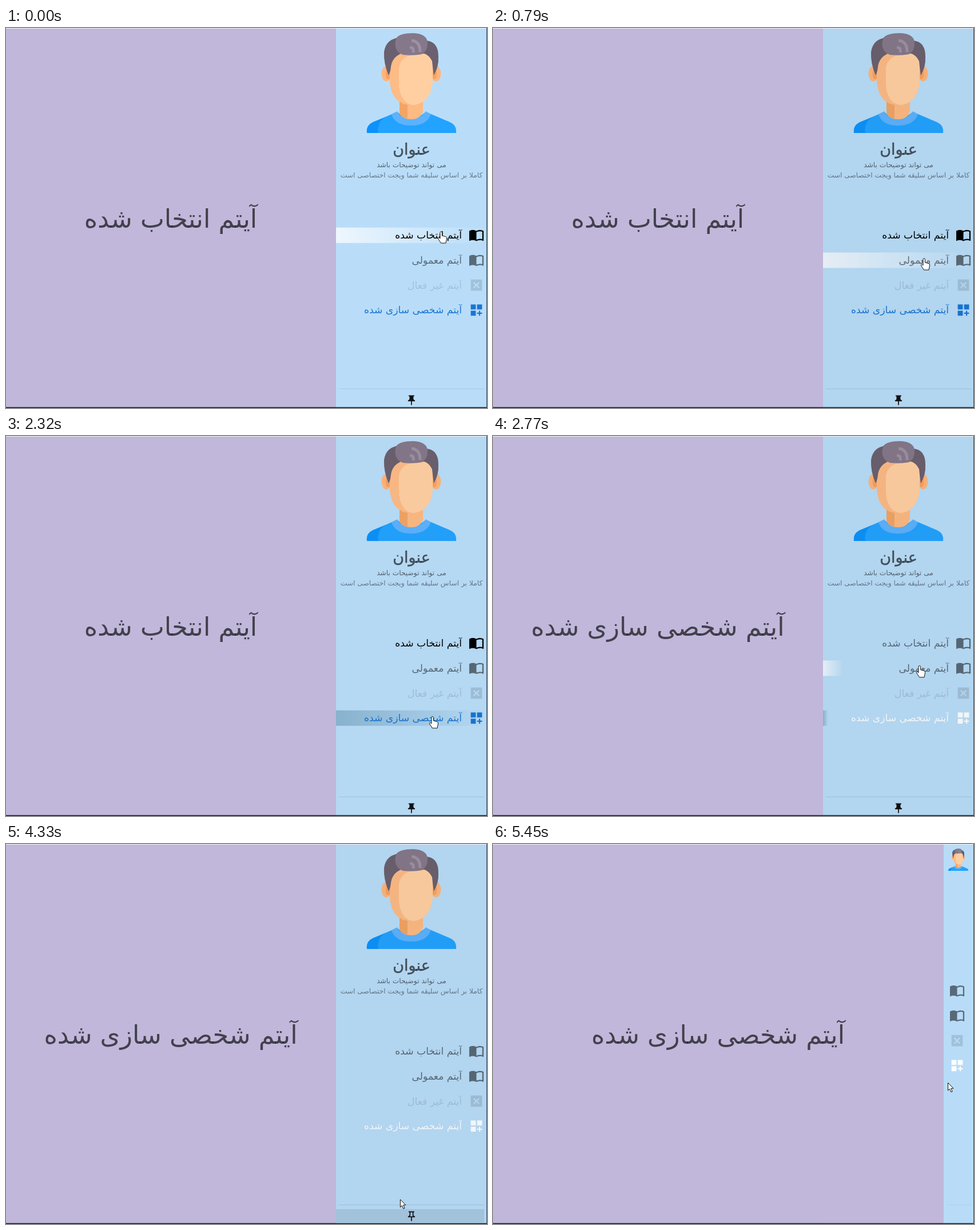
An HTML page for the animation above (5500 ms loop, 841x666 px).

```html
<!DOCTYPE html>
<html lang="fa">
<head>
<meta charset="utf-8">
<style>
html, body { margin: 0; width: 100%; height: 100%; overflow: hidden; }
svg { display: block; font-family: "DejaVu Sans", "Noto Sans", sans-serif; }
</style>
</head>
<body>
<svg width="841" height="666" viewBox="0 0 841 666">
  <defs>
    <linearGradient id="light"><stop stop-color="#fff" stop-opacity=".75"/><stop offset="1" stop-color="#fff" stop-opacity="0"/></linearGradient>
    <linearGradient id="dark"><stop stop-color="#1d5a78" stop-opacity=".3"/><stop offset="1" stop-color="#1d5a78" stop-opacity="0"/></linearGradient>
  </defs>
  <rect width="841" height="666" fill="#c0b7da"/>
  <text id="heading" y="350" font-size="44.5" text-anchor="middle" fill-opacity=".65"></text>

  <g id="panel">
    <rect id="back" y="1" height="664" fill="#b9ddf9"/>
    <g id="avatar">
      <path fill="#22a3ff" d="M631 184c-1-10 3-16 13-20l40-17q24 23 50 0l40 17c10 4 14 10 13 20z"/>
      <path fill="#0b92fb" d="M631 184c-1-10 3-16 13-20l20-8c-12 6-15 18-13 28z"/>
      <path fill="#5db2fd" d="M674 151q6 20 34 20t35-20l-9-5q-8 13-26 13t-24-13z"/>
      <path fill="#fdba82" d="M688 125h41v21q-4 14-21 14-16 0-20-12z"/>
      <path fill="#f2a566" d="M688 125h14v34q-14-3-14-11z"/>
      <ellipse cx="665" cy="80" rx="8.5" ry="13.5" fill="#fdb57d"/>
      <ellipse cx="752" cy="80" rx="8.5" ry="13.5" fill="#fdb57d"/>
      <ellipse cx="668" cy="81" rx="4.5" ry="9" fill="#f9a25f"/>
      <ellipse cx="749" cy="81" rx="4.5" ry="9" fill="#f9a25f"/>
      <path fill="#fdbb86" d="M671 40v55q4 40 38 40 33-3 37-40V40z"/>
      <path fill="#ffcfa2" d="M687 70v30q3 32 25 35 30-3 34-40V45q-55-5-59 25z"/>
      <path fill="#6b606f" d="M669 83q-9-21-8-41 3-24 31-26l43 6q21 2 21 28 1 18-8 33-2-13-3-25-5-10-13-13h-42q-15 7-17 23-1 10-4 15z"/>
      <path fill="#85788a" d="M737 28q1-18-25-19-24 0-30 9-6 22 12 29 18 2 33-1 10-6 10-18z"/>
      <path fill="none" stroke="#9c90a2" stroke-width="5" d="M709 22q15 1 15 20M706 34q8 0 6 9"/>
    </g>
    <g id="words" text-anchor="middle">
      <text x="709" y="222" font-size="27" fill-opacity=".6" stroke="#000" stroke-opacity=".5" stroke-width=".6">عنوان</text>
      <text x="709" y="244" font-size="12.2" fill-opacity=".55">می تواند توضیحات باشد</text>
      <text x="709" y="262" font-size="12.2" fill-opacity=".45">کاملا بر اساس سلیقه شما ویجت اختصاصی است</text>
    </g>
    <g id="rows"></g>
    <rect id="line" y="632" height="1" fill="#a6c5de"/>
    <g id="foot">
      <rect id="pinHover" x="577" y="640" width="259" height="23" fill="#000"/>
      <path id="pin" transform="translate(698.5 642) scale(.87)" fill="#111" fill-rule="evenodd"/>
    </g>
    <rect id="dim" y="1" height="664" fill="#000"/>
  </g>

  <rect width="841" height="1" fill="#f3f1f5"/>
  <rect y="664.5" width="841" height="1.5" fill="#1c1c20"/>
  <rect x="840" width="1" height="666" fill="#34495c"/>
  <path id="cursor" fill="#fff" stroke="#111" stroke-linejoin="round"/>
</svg>

<script>
const LOOP = 5500, PICK = 2350, UNPIN = 4100;
const FULL = 577, SLIM = 788, EDGE = 840;

const BOOK = 'M21 5c-1.11-.35-2.33-.5-3.5-.5-1.95 0-4.05.4-5.5 1.5-1.45-1.1-3.55-1.5-5.5-1.5S2.45 4.9 1 6v14.65c0 .25.25.5.5.5.1 0 .15-.05.25-.05C3.1 20.45 5.05 20 6.5 20c1.95 0 4.05.4 5.5 1.5 1.35-.85 3.8-1.5 5.5-1.5 1.65 0 3.35.3 4.75 1.05.1.05.15.05.25.05.25 0 .5-.25.5-.5V6c-.6-.45-1.25-.75-2-1zm0 13.5c-1.1-.35-2.3-.5-3.5-.5-1.7 0-4.15.65-5.5 1.5V8c1.35-.85 3.8-1.5 5.5-1.5 1.2 0 2.4.15 3.5.5z';
const CROSS = 'M3 3v18h18V3zm14 12.6L15.6 17 12 13.4 8.4 17 7 15.6 10.6 12 7 8.4 8.4 7l3.6 3.6L15.6 7 17 8.4 13.4 12z';
const TILES = 'M3 3h8v8H3zm10 0h8v8h-8zM3 13h8v8H3zm15 0h-2v3h-3v2h3v3h2v-3h3v-2h-3z';
const PIN = 'M16 9V4h1c.55 0 1-.45 1-1s-.45-1-1-1H7c-.55 0-1 .45-1 1s.45 1 1 1h1v5c0 1.66-1.34 3-3 3v2h5.97v7l1 1 1-1v-7H19v-2c-1.66 0-3-1.34-3-3z';
const PIN_HOLE = 'M14 4v5c0 1.12.37 2.16 1 3H9c.65-.86 1-1.9 1-3V4z';
const ARROW = 'M.5.5V14l3-2.8 2.4 5.6 2.3-1L5.8 10.300H10z';
const HAND = 'M-2 1.500a1.700 1.700 0 0 1 3.400 0V7l6 1.500q2.500.7 2.200 3.500l-1.600 8H-.5L-5 13q-1.500-2.500.5-3l2.500 2z';

const items = [
  ['آیتم انتخاب شده', BOOK],
  ['آیتم معمولی', BOOK],
  ['آیتم غیر فعال', CROSS],
  ['آیتم شخصی سازی شده', TILES]
];
const PIN_ROW = 4;

// row, pointer enters, pointer leaves
const hovers = [
  [0, -300, 420], [1, 480, 1150], [3, 1400, 1620], [3, 2120, 2593], [1, 2725, 2860],
  [0, 2920, 3400], [1, 3430, 3480], [3, 3570, 3640], [PIN_ROW, 3920, 4290]
];

// time, x, y
const path = [
  [0, 761, 357], [250, 760, 358], [500, 756, 396], [790, 754, 404], [1050, 752, 405],
  [1300, 749, 450], [1500, 746, 492], [1780, 743, 519], [2000, 745, 515], [2200, 746, 492],
  [2520, 746, 492], [2593, 746, 480], [2725, 746, 419], [2770, 746, 403], [3000, 747, 360],
  [3330, 747, 362], [3650, 735, 515], [3950, 709, 648], [4200, 707, 648], [4330, 690, 623],
  [4450, 560, 560], [4620, 389, 517], [4880, 410, 535], [5200, 669, 560], [5450, 795, 418], [5500, 795, 418]
];

// slight change of the panel's brightness: time, opacity
const shade = [[0, 0], [600, .035], [1200, .035], [1600, .005], [2200, .005], [2400, .035], [4400, .035], [4600, .005], [5500, .005]];

const $ = id => document.getElementById(id);
const set = (el, attrs) => { for (const k in attrs) el.setAttribute(k, attrs[k]); };
const clamp = v => Math.min(1, Math.max(0, v));
const smooth = v => v * v * (3 - 2 * v);
const mix = (a, b, p) => a + (b - a) * p;

function along(keys, t) {
  const i = Math.max(1, keys.findIndex(k => k[0] >= t));
  const a = keys[i - 1], b = keys[i];
  const p = clamp((t - a[0]) / (b[0] - a[0]));
  return a.slice(1).map((v, j) => mix(v, b[j + 1], p));
}

function hoverLevel(row, t) {
  return Math.max(...hovers.filter(h => h[0] === row).map(([, on, off]) =>
    smooth(Math.min(clamp((t - on) / 200), clamp((Math.min(200, off - on) - (t - off)) / 200)))));
}

function paint(row, picked) {
  if (row === 2) return ['#000', .12];
  if (row === 3) return picked ? ['#fff', .95] : ['#1976d2', 1];
  return ['#000', row === 0 && !picked ? 1 : .52];
}

const rows = items.map(([label, icon], i) => {
  const g = document.createElementNS('http://www.w3.org/2000/svg', 'g');
  g.innerHTML = `<rect y="-13.500" height="27" fill="url(#${i === 3 ? 'dark' : 'light'})"/>
    <text x="797" y="6" font-size="17.200" text-anchor="end">${label}</text>
    <path d="${icon}"/>`;
  $('rows').append(g);
  const [bar, text, mark] = g.children;
  return { g, bar, text, mark, midY: icon === BOOK ? 12.6 : 12, scale: icon === BOOK ? 1.14 : 1.1 };
});

function draw(t) {
  const picked = t >= PICK;
  const fold = 1 - (1 - clamp((t - 4380) / 300)) ** 3;
  const left = mix(FULL, SLIM, fold);
  const wordsOpacity = clamp(1 - fold * 3);

  $('heading').textContent = items[picked ? 3 : 0][0];
  set($('heading'), { x: left / 2 - .5 });
  for (const id of ['back', 'dim']) set($(id), { x: left, width: EDGE - left });
  set($('dim'), { opacity: along(shade, t)[0] });
  set($('avatar'), { transform: `translate(${mix(708.5, 813.5, fold)} ${mix(9, 8, fold)}) scale(${mix(1, .223, fold)}) translate(-708.5 -9)` });
  set($('words'), { opacity: wordsOpacity });
  set($('foot'), { opacity: wordsOpacity });
  set($('line'), { x: left + 5, width: EDGE - left - 9, opacity: mix(1, .5, fold) });
  set($('pinHover'), { opacity: .1 * hoverLevel(PIN_ROW, t) });
  set($('pin'), { d: t < UNPIN ? PIN : PIN + PIN_HOLE });

  rows.forEach(({ g, bar, text, mark, midY, scale }, i) => {
    const [fill, alpha] = paint(i, picked);
    const level = i === 2 ? 0 : hoverLevel(i, t);
    set(g, { transform: `translate(0 ${mix(363.3, 257.300, fold) + i * 43.7})` });
    set(bar, { x: left, width: (EDGE - left) * level });
    set(text, { fill, 'fill-opacity': alpha, opacity: wordsOpacity });
    set(mark, { fill, 'fill-opacity': alpha, transform: `translate(${mix(822.5, 811.5, fold)} 0) scale(${scale}) translate(-12 ${-midY})` });
  });

  const [x, y] = along(path, t);
  const hand = hovers.some(([, on, off]) => t >= on && t < off);
  set($('cursor'), { d: hand ? HAND : ARROW, transform: `translate(${x} ${y})` });
}

const start = performance.now();
function tick() {
  draw((performance.now() - start) % LOOP);
  requestAnimationFrame(tick);
}
tick();
</script>
</body>
</html>
```
